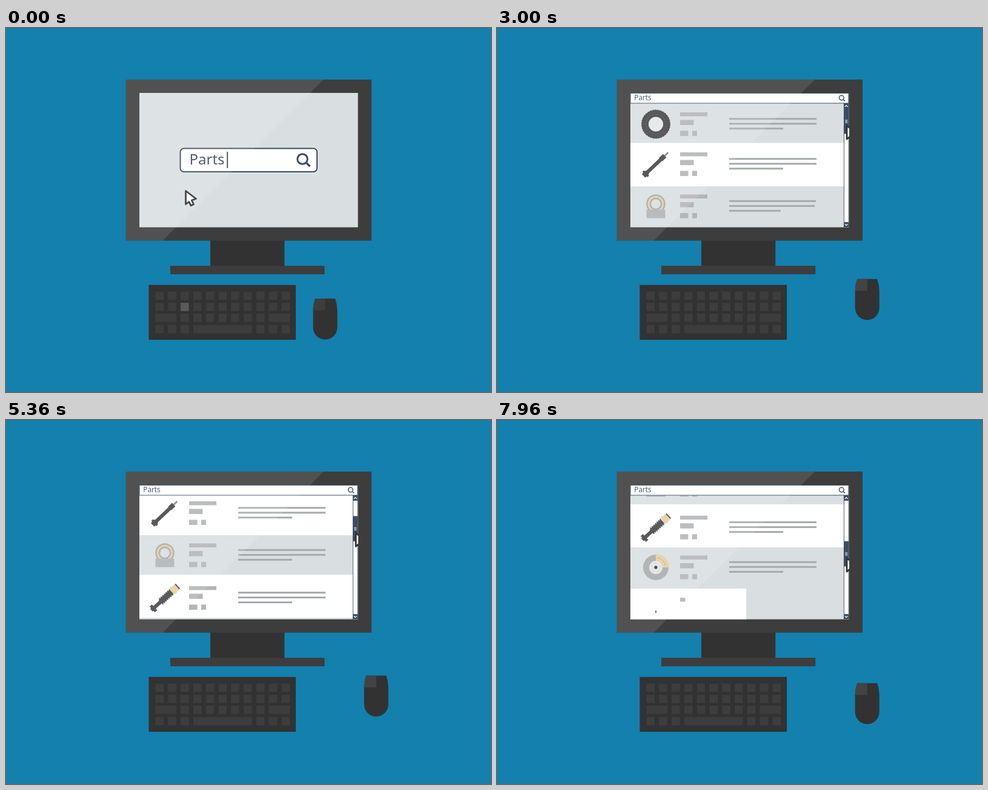
Write an HTML page with a canvas that moves like this. It is 800 px wide and 600 px high and loops after 8000 ms.

```html
<!DOCTYPE html>
<html lang="en">
<head>
<meta charset="utf-8">
<title>Parts search</title>
<style>
  html, body { margin: 0; width: 100%; height: 100%; overflow: hidden; background: #1380ae; }
  canvas { display: block; width: 800px; height: 600px; }
</style>
</head>
<body>
<canvas id="stage" width="800" height="600"></canvas>
<script>
const ctx = document.getElementById('stage').getContext('2d');
const LOOP = 8000;
const BLUE = '#1380ae', DARK = '#323232', GREY = '#3d3d3d', SCREEN = '#d9dfe1', NAVY = '#3a4e61';
const STEEL = '#a9abac', TAN = '#e6cfa0', IRON = '#464646';

const progress = (t, start, length) => Math.min(1, Math.max(0, (t - start) / length));
const inOut = p => (1 - Math.cos(Math.PI * p)) / 2;
const out = p => 1 - (1 - p) ** 4;
const back = p => p <= 0 ? 0 : 1 + 2.7 * (p - 1) ** 3 + 1.7 * (p - 1) ** 2;
const mix = (a, b, p) => a + (b - a) * p;

function box(x, y, w, h, color) {
  ctx.fillStyle = color;
  ctx.fillRect(x, y, w, h);
}
function disc(x, y, r, color) {
  ctx.fillStyle = color;
  ctx.beginPath();
  ctx.arc(x, y, r, 0, 7);
  ctx.fill();
}
function ring(x, y, r, width, color) {
  ctx.strokeStyle = color;
  ctx.lineWidth = width;
  ctx.beginPath();
  ctx.arc(x, y, r, 0, 7);
  ctx.stroke();
}
function line(points, width, color) {
  ctx.strokeStyle = color;
  ctx.lineWidth = width;
  ctx.beginPath();
  points.forEach(([x, y]) => ctx.lineTo(x, y));
  ctx.stroke();
}
function shape(points, color) {
  ctx.fillStyle = color;
  ctx.beginPath();
  points.forEach(([x, y]) => ctx.lineTo(x, y));
  ctx.fill();
}
function group(x, y, scale, angle, draw) {
  ctx.save();
  ctx.translate(x, y);
  ctx.scale(scale, scale);
  ctx.rotate(angle);
  draw();
  ctx.restore();
}
function clipped(x, y, w, h, draw) {
  ctx.save();
  ctx.beginPath();
  ctx.rect(x, y, w, h);
  ctx.clip();
  draw();
  ctx.restore();
}

// Part pictures, each drawn around its own centre
function tire() {
  ring(0, 0, 17.5, 11.5, IRON);
  ctx.setLineDash([3, 1.2]);
  ring(0, 0, 22.8, 2.4, IRON);
  ctx.setLineDash([]);
  ring(0, 0, 16.5, 1, '#555');
  disc(0, 0, 12, '#e3e7e9');
}
function arm() {
  ctx.rotate(-0.76);
  box(18, -1.5, 10, 3, '#8d8f90');
  box(-22, -3, 42, 6, IRON);
  box(11, -4, 9, 8, IRON);
  box(-28, -4, 9, 8, IRON);
  box(-25, -6, 4, 12, IRON);
}
function bearing() {
  disc(0, -4, 15.8, STEEL);
  disc(0, -4, 13.3, TAN);
  disc(0, -4, 10.4, STEEL);
  disc(0, -4, 7.8, '#dadfe1');
  box(-15.5, 5.5, 31, 14, '#b1b3b5');
}
function shock() {
  ctx.rotate(-0.74);
  box(-24, -3, 16, 6, IRON);
  box(-28, -6.5, 5, 13, IRON);
  box(-30, -3, 5, 6, IRON);
  box(-10, -4.5, 27, 9, IRON);
  for (let x = -9; x < 15; x += 3.6) line([[x, 6], [x + 2, -6]], 1.9, IRON);
  box(15, -6, 12, 12, TAN);
  box(18, -7, 3, 14, TAN);
  box(27, -5.5, 2, 11, IRON);
}
function brake() {
  disc(0, 0, 21, STEEL);
  ctx.fillStyle = TAN;
  ctx.beginPath();
  ctx.arc(0, 0, 22, -Math.PI / 2, 0);
  ctx.arc(0, 0, 11, 0, -Math.PI / 2, true);
  ctx.fill();
  ctx.strokeStyle = '#c7ae7d';
  ctx.lineWidth = 1;
  ctx.beginPath();
  ctx.arc(0, 0, 16, -1.45, -0.12);
  ctx.stroke();
  disc(0, 0, 11, '#e1e3e4');
  for (let i = 0; i < 5; i++) disc(7 * Math.sin(i * 1.257), -7 * Math.cos(i * 1.257), 0.8, STEEL);
  disc(0, 0, 2.6, '#333');
}
function plug() {
  ring(0, 9, 3, 2.4, IRON);
  box(-4, 11, 8, 10, IRON);
}

// top and height of the band, y of the title, time of the white sweep, time of the contents
const ROWS = [
  { top: 124, height: 65, title: 139, start: 540, art: tire },
  { top: 189.5, height: 71.5, title: 205, sweep: 1000, start: 1290, art: arm },
  { top: 261, height: 65, title: 274.5, start: 2010, art: bearing },
  { top: 326, height: 71, title: 344.8, sweep: 3680, start: 3850, art: shock },
  { top: 397, height: 68, title: 410.5, start: 5700, art: brake },
  { top: 465, height: 71, title: 480, sweep: 7750, start: 7920, art: plug }
];
const BLOCKS = [[302, 0, 45, 6.5], [302, 12.5, 22.5, 8.5], [302, 30.5, 13.5, 8.5], [322, 30.5, 8, 8.5]];
const LINES = [144, 144, 89];

function row({ top, height, title, sweep, start, art }, t) {
  if (sweep) box(220, top, 352 * inOut(progress(t, sweep, 400)), height, '#fff');
  BLOCKS.forEach(([x, y, w, h], i) =>
    box(x, title + y, w * out(progress(t, start + i * 40, 800)), h, '#b3b5b7'));
  LINES.forEach((w, i) =>
    box(383, title + 9.3 + i * 8, w * out(progress(t, start + 420 + i * 70, 800)), 3, '#a6abad'));
  const size = back(progress(t, start, 720));
  if (size > 0) group(262, title + 19.5, size, 0, art);
}

const scrollAt = t => 71 * inOut(progress(t, 3600, 600))
  + 67 * inOut(progress(t, 5360, 920))
  + 71 * inOut(progress(t, 7530, 690));

function pointerAt(t) {
  const first = inOut(progress(t, 800, 660)), second = inOut(progress(t, 2280, 580));
  return {
    x: 296.5 + 231 * first + 49.5 * second,
    y: 268.5 - 89 * first - 18.5 * second + scrollAt(t) / 2.8
  };
}

function searchBar(t) {
  const p = out(progress(t, 80, 620));
  const x = mix(287.5, 220, p), y = mix(198.5, 107.5, p);
  ctx.beginPath();
  ctx.roundRect(x, y, mix(225.5, 360, p), mix(38.5, 16.5, p), mix(6, 0, p));
  ctx.fillStyle = '#fff';
  ctx.fill();
  ctx.strokeStyle = NAVY;
  ctx.lineWidth = mix(2, 1.2, p);
  ctx.stroke();
  group(mix(304, 227, p), mix(225, 119.3, p), mix(1, 0.49, p), 0, () => {
    ctx.fillStyle = NAVY;
    ctx.font = '24px "Noto Sans", sans-serif';
    ctx.fillText('Parts', -1.5, 0);
    if (t < 80) box(60.2, -21, 2, 27, NAVY);
  });
  group(mix(489, 568.3, p), mix(216, 115, p), mix(1, 0.46, p), 0, () => {
    ring(0, 0, 8.3, 3, NAVY);
    line([[6, 6], [12.5, 12]], 3.4, NAVY);
  });
}

function scrollBar(t) {
  const p = out(progress(t, 400, 400));
  if (!p) return;
  clipped(571, 124, 10, 205 * p, () => {
    box(572, 124, 8.5, 205, '#fff');
    line([[572.4, 124], [572.4, 329]], 0.9, NAVY);
    line([[580.1, 124], [580.1, 329]], 0.9, NAVY);
    box(572, 124, 8.5, 9, NAVY);
    box(572, 320, 8.5, 9, NAVY);
    line([[573.8, 130], [576.2, 127.6], [578.6, 130]], 1.1, '#fff');
    line([[573.8, 323], [576.2, 325.4], [578.6, 323]], 1.1, '#fff');
    const y = 133 + scrollAt(t) / 2.8;
    box(572, y, 8.5, 41.5, NAVY);
    for (let i = 0; i < 3; i++) box(574.2, y + 18.5 + i * 2, 4, 1, '#e2e6e9');
  });
}

function pointer({ x, y }) {
  ctx.beginPath();
  [[0, 0], [0, 22], [5.2, 18], [8.7, 24.3], [13, 22], [9.8, 15.5], [17, 13]]
    .forEach(([dx, dy]) => ctx.lineTo(x + dx, y + dy));
  ctx.closePath();
  ctx.fillStyle = '#fff';
  ctx.fill();
  ctx.strokeStyle = '#333';
  ctx.lineWidth = 2.8;
  ctx.lineJoin = 'round';
  ctx.stroke();
  ctx.lineJoin = 'miter';
}

function keyboard(t) {
  box(235.5, 423.5, 242.5, 90.5, DARK);
  const key = (col, line, w = 13.5) => box(246.5 + col * 20.8, [434.5, 453, 471, 489.7][line], w, 13.5, GREY);
  for (let col = 0; col < 11; col++) {
    key(col, 0);
    key(col, 1);
    if (col > 1 && col < 9) key(col, 2);
    if (col < 3 || col > 7) key(col, 3);
  }
  key(0, 2, 34.3);
  key(9, 2, 34.3);
  key(3, 3, 96.7);
  if (t < 80) box(288, 453, 13.5, 13.5, '#5a5a5a');
}

const MOUSE = new Path2D('M-16.5 0H16.5Q20 10 20 20V47.5A20 20 0 0 1-20 47.5V20Q-20 10-16.5 0Z');
const BUTTON = new Path2D('M-16.5 0H0V19.5H-20Q-20 10-16.5 0Z');

function mouse(t) {
  const { x, y } = pointerAt(t);
  group(526.5 + (x - 296.5) * 0.3, 446 + (y - 268.5) * 0.3, 1, 0, () => {
    ctx.fillStyle = DARK;
    ctx.fill(MOUSE);
    ctx.fillStyle = t > 2940 ? '#434343' : GREY;
    ctx.fill(BUTTON);
  });
}

function draw(t) {
  box(0, 0, 800, 600, BLUE);
  box(337, 350, 122.3, 42, DARK);
  box(271, 392, 254.3, 14, GREY);
  box(197.5, 85, 405.5, 265.5, GREY);
  box(220, 107, 360.5, 221.5, SCREEN);
  clipped(220, 124, 352, 204.5, () => {
    ctx.translate(0, -scrollAt(t));
    ROWS.forEach(item => row(item, t));
  });
  clipped(219.5, 106.5, 361.5, 222, () => {
    searchBar(t);
    scrollBar(t);
    pointer(pointerAt(t));
  });
  shape([[197.5, 85], [524, 85], [258.5, 350.5], [197.5, 350.5]], 'rgba(255,255,255,.1)');
  keyboard(t);
  mouse(t);
}

const began = performance.now();
function tick() {
  draw((performance.now() - began) % LOOP);
  requestAnimationFrame(tick);
}
tick();
</script>
</body>
</html>
```
